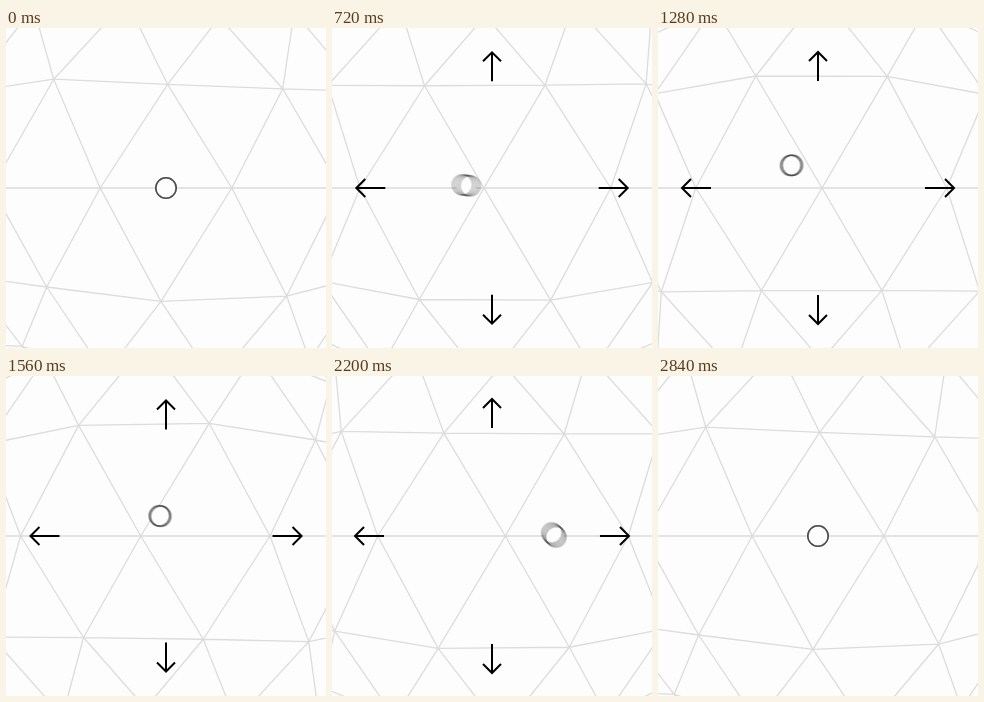
Recreate the animation shown at these times as an HTML page with a canvas. Size 320 px wide and 320 px high, loop 3000 ms.

```html
<!DOCTYPE html>
<html lang="en">
<head>
<meta charset="utf-8">
<title>Sphere and ring</title>
<style>
  html, body { margin: 0; width: 100%; height: 100%; overflow: hidden; background: #fdfdfd; }
  canvas { display: block; width: 100vmin; height: 100vmin; }
</style>
</head>
<body>
<canvas id="stage" width="320" height="320"></canvas>
<script>
const ctx = document.getElementById('stage').getContext('2d');
const LOOP = 3000, STEP = 40, START = 40, END = 2840;
const FOCAL = 426, DISTANCE = 2, DETAIL = 4;
const BACKGROUND = '#fdfdfd';
const RAD = Math.PI / 180;

// [time, value, slope per ms]
const turn = [
  [560, 9, 0], [920, -20.4, -.055], [1560, -39.4, 0],
  [1960, -3, .04], [2200, 1.8, .015], [2780, 9, 0]
];
const ringX = [
  [560, 0, 0], [920, -55, .07], [1560, -6, .06],
  [1960, 66, .02], [2200, 62, -.14], [2780, 0, 0]
];
const ringY = [
  [560, 0, 0], [920, -12, -.06], [1560, -20, .02],
  [1960, -1, .03], [2200, -1, -.14], [2780, 0, 0]
];

// Cubic Hermite curve through the keys, held at both ends.
function follow(keys, t) {
  if (t <= keys[0][0]) return keys[0][1];
  const next = keys.findIndex(key => key[0] >= t);
  if (next < 0) return keys[keys.length - 1][1];
  const [t0, v0, s0] = keys[next - 1], [t1, v1, s1] = keys[next];
  const span = t1 - t0, p = (t - t0) / span, q = 1 - p;
  return q * q * ((1 + 2 * p) * v0 + p * span * s0)
       + p * p * ((1 + 2 * q) * v1 - q * span * s1);
}

const dot = (a, b) => a[0] * b[0] + a[1] * b[1] + a[2] * b[2];

// Icosahedron with vertical axis, each face split and pushed onto the sphere.
function buildEdges() {
  const corners = [[0, 0, 1], [0, 0, -1]];
  for (let i = 0; i < 10; i++) {
    const a = i * 36 * RAD, r = 2 / Math.sqrt(5);
    corners.push([r * Math.cos(a), r * Math.sin(a), (i % 2 ? -1 : 1) / Math.sqrt(5)]);
  }
  const near = (a, b) => dot(a, b) > .4;
  const edges = [];
  corners.forEach((a, i) => corners.forEach((b, j) => corners.forEach((c, k) => {
    if (i >= j || j >= k || !near(a, b) || !near(b, c) || !near(a, c)) return;
    const point = (u, v) => {
      const p = a.map((n, m) => n * (DETAIL - u - v) + b[m] * u + c[m] * v);
      const size = Math.sqrt(dot(p, p));
      return p.map(n => n / size);
    };
    for (let u = 0; u < DETAIL; u++) {
      for (let v = 0; u + v < DETAIL; v++) {
        const p = point(u, v), q = point(u + 1, v), r = point(u, v + 1);
        edges.push([p, q], [q, r], [r, p]);
      }
    }
  })));
  return edges;
}
const edges = buildEdges();

function drawSphere(angle) {
  const c = Math.cos(angle * RAD), s = Math.sin(angle * RAD);
  const rotate = ([x, y, z]) => [x * c - y * s, x * s + y * c, z];
  const project = ([x, y, z]) => {
    const scale = FOCAL / (DISTANCE - x);
    return [160 + y * scale, 160 - z * scale];
  };
  ctx.beginPath();
  for (const edge of edges) {
    const [a, b] = edge.map(rotate);
    if (a[0] < .4 || b[0] < .4) continue;
    ctx.moveTo(...project(a));
    ctx.lineTo(...project(b));
  }
  ctx.strokeStyle = '#dcdcdc';
  ctx.lineWidth = 1.3;
  ctx.stroke();
}

function drawRing(t) {
  const samples = 10, radius = 10.2;
  const circle = offset => {
    const time = t + offset * STEP;
    ctx.beginPath();
    ctx.arc(160 + follow(ringX, time), 160 + follow(ringY, time), radius, 0, 2 * Math.PI);
  };
  circle(0);
  ctx.fillStyle = BACKGROUND;
  ctx.fill();
  ctx.lineWidth = 1.5;
  ctx.strokeStyle = 'rgba(0, 0, 0, .11)';
  for (let i = 0; i < samples; i++) {
    circle((i + .5) / samples - .5);
    ctx.stroke();
  }
}

function drawArrows(t) {
  const pulse = t < 540 ? Math.sin(Math.PI * t / 520) : 0;
  const pull = Math.hypot(follow(ringX, t), follow(ringY, t));
  const tip = 134.8 + 14.6 * Math.max(0, pulse) + .035 * pull;
  ctx.strokeStyle = '#000';
  ctx.lineWidth = 2;
  for (let side = 0; side < 4; side++) {
    ctx.save();
    ctx.translate(160, 160);
    ctx.rotate(side * Math.PI / 2);
    ctx.beginPath();
    ctx.moveTo(tip - 29, 0);
    ctx.lineTo(tip, 0);
    ctx.moveTo(tip - 9, -9);
    ctx.lineTo(tip, 0);
    ctx.lineTo(tip - 9, 9);
    ctx.stroke();
    ctx.restore();
  }
}

function draw(now) {
  const t = Math.floor((now % LOOP) / STEP) * STEP;
  ctx.fillStyle = BACKGROUND;
  ctx.fillRect(0, 0, 320, 320);
  drawSphere(follow(turn, t));
  drawRing(t);
  if (t >= START && t < END) drawArrows(t);
}

function loop() {
  draw(performance.now());
  requestAnimationFrame(loop);
}
loop();
</script>
</body>
</html>
```
